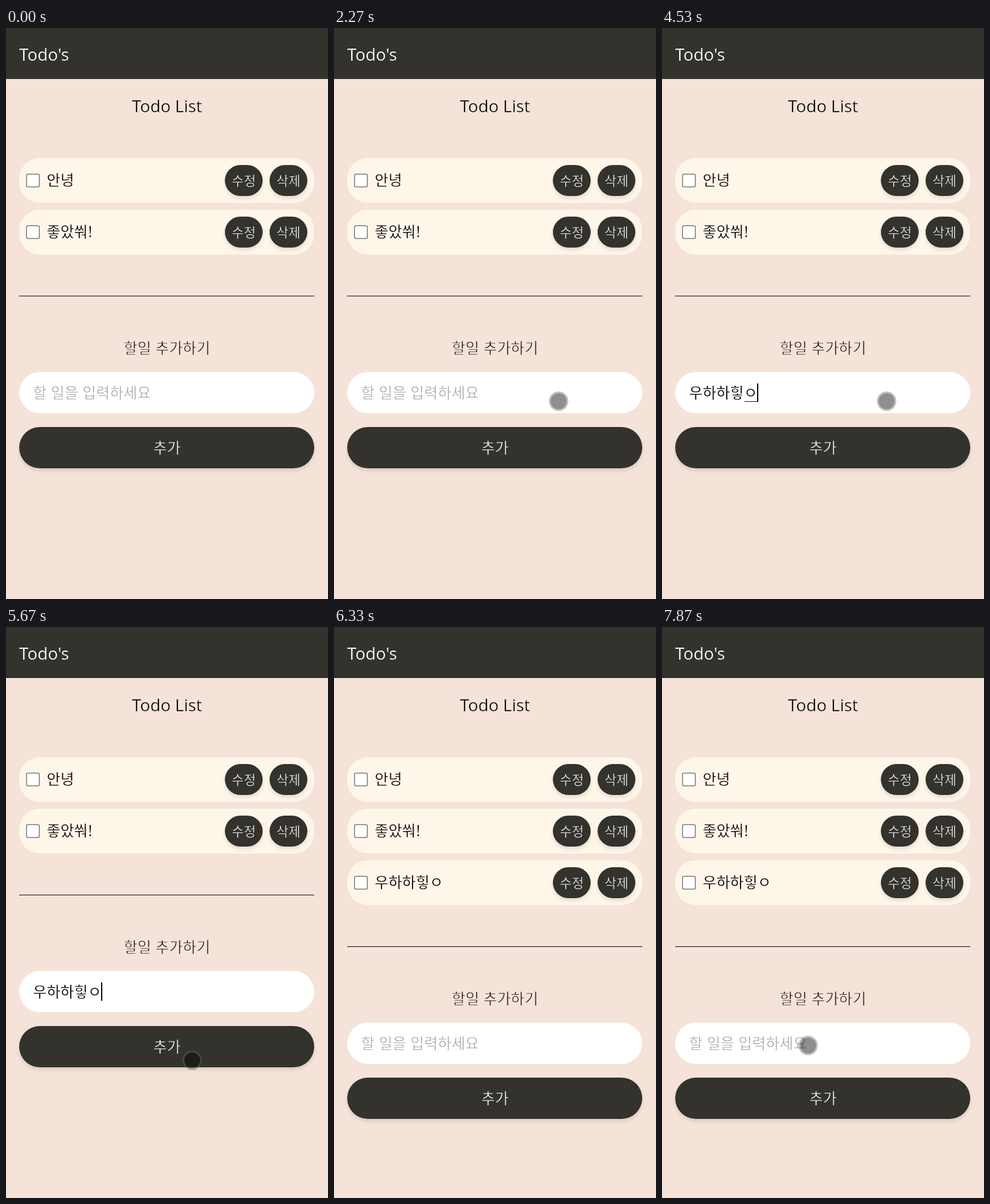
An HTML page for the animation above (8000 ms loop, 562 by 996 pixels).

```html
<!DOCTYPE html>
<html lang="ko">
<head>
<meta charset="utf-8">
<title>Todo's</title>
<style>
  html, body { margin: 0; width: 100%; height: 100%; overflow: hidden; background: #f5e3d9; }
  svg { display: block; width: 562px; height: 996px; }
  text { font-family: "Noto Sans CJK KR", "Noto Sans CJK JP", "Noto Sans CJK", sans-serif; font-size: 26px; font-weight: 300; white-space: pre; }
  .latin { font-family: "Open Sans", "Noto Sans", sans-serif; font-size: 29.4px; font-weight: 400; }
  .small { font-size: 22.8px; }
  .mid { text-anchor: middle; }
  .btn { fill: #33322d; filter: drop-shadow(0 4px 3px rgba(0, 0, 0, .11)); }
</style>
</head>
<body>
<svg id="stage" viewBox="0 0 562 996"></svg>
<script>
const NS = "http://www.w3.org/2000/svg";
const PAPER = "#f5e3d9", DARK = "#33322d", CARD = "#fff6ea";
const LOOP = 8000, TAP = 5730, BLUR = 5870, ADDED = 6330;
const stage = document.getElementById("stage");

function add(parent, tag, attrs, content) {
  const el = document.createElementNS(NS, tag);
  for (const key in attrs) el.setAttribute(key, attrs[key]);
  if (content) el.textContent = content;
  parent.appendChild(el);
  return el;
}
const box = (parent, x, y, width, height, rx, attrs) =>
  add(parent, "rect", { x, y, width, height, rx, ...attrs });

// An outline in the background colour makes the strokes finer.
const label = (parent, x, y, content, cls, fill, back, thin = 0.5) =>
  add(parent, "text", { x, y, class: cls, fill, stroke: back, "stroke-width": thin }, content);
const show = (el, on) => el.setAttribute("visibility", on ? "visible" : "hidden");

function todo(y, content) {
  const row = add(stage, "g", { transform: `translate(0 ${y})` });
  box(row, 23, 0, 515, 78, 36, { fill: CARD });
  box(row, 35.75, 27.75, 22.5, 22.5, 3, { fill: "#fff", stroke: "#767676", "stroke-width": 1.5 });
  label(row, 71, 48, content, "", "#000", CARD, 0.3);
  ["수정", "삭제"].forEach((name, i) => {
    const x = 382 + 78 * i;
    box(row, x, 12, 66, 54, 27, { class: "btn" });
    label(row, x + 33, 47.5, name, "small mid", "#fff", DARK);
  });
  return row;
}

box(stage, 0, 0, 562, 996, 0, { fill: PAPER });
box(stage, 0, 0, 562, 89, 0, { fill: DARK });
label(stage, 23, 57, "Todo's", "latin", "#fff", DARK, 0.2);
label(stage, 281, 147, "Todo List", "latin mid", "#000", PAPER, 0.4);
const rows = ["안녕", "좋았쒀!", "우하하힣ㅇ"].map((name, i) => todo(227 + 90 * i, name));

const form = add(stage, "g", {});
box(form, 23, 467, 515, 1, 0, { fill: "#000" });
label(form, 281, 568, "할일 추가하기", "mid", "#000", PAPER, 0.8);
box(form, 23, 600, 515, 72, 36, { fill: "#fff" });
const hint = label(form, 47, 646, "할 일을 입력하세요", "", "#a1a3ab", "#fff");
const typed = label(form, 47, 646, "", "", "#000", "#fff", 0.3);
const underline = box(form, 48, 651, 24, 1, 0, { fill: "#000" });
const caret = box(form, 47, 620, 2, 32, 0, { fill: "#000" });
box(form, 23, 696, 515, 72, 36, { class: "btn" });
label(form, 281, 742, "추가", "mid", "#fff", DARK);
const press = box(form, 23, 696, 515, 72, 36, { fill: "#000" });

const pointer = add(stage, "g", {});
add(pointer, "circle", { r: 14, fill: "rgba(0,0,0,.44)" });
add(pointer, "circle", { r: 15.4, fill: "none", stroke: "rgba(100,100,100,.4)", "stroke-width": 3 });

const glides = [
  { start: 1600, rest: 1730, end: 5130, from: [444, 583], to: [392, 651] },
  { start: 5270, rest: 5530, end: 6000, from: [352, 724], to: [325, 756] },
  { start: 7470, rest: 7600, end: LOOP, from: [262, 737], to: [255, 730] }
];

function pointerAt(t) {
  const glide = glides.find(g => t >= g.start && t < g.end);
  if (!glide) return null;
  const { start, rest, from, to } = glide;
  const left = (1 - Math.min(1, (t - start) / (rest - start))) ** 2;
  return to.map((v, i) => v + (from[i] - v) * left);
}

// Each consonant first joins the syllable before it, then moves on with its vowel.
const said = "우하하히";
const keyTime = k => 3465 + 185 * k + 13 * k * k;
const LAST_KEY = keyTime(said.length) + 60;
const closeWithH = s => s.slice(0, -1) + String.fromCharCode(s.charCodeAt(s.length - 1) + 27);

function typedAt(t) {
  if (t < keyTime(0) || t >= ADDED) return "";
  let k = 0;
  while (k < said.length && t >= keyTime(k + 1)) k++;
  if (t < keyTime(k) + 60) return k ? closeWithH(said.slice(0, k)) : "ㅇ";
  return k < said.length ? said.slice(0, k + 1) : closeWithH(said) + "ㅇ";
}

const blink = time => Math.floor(time / 515) % 2 === 0;
function caretAt(t) {
  if (t < keyTime(0)) return t >= 1000 && blink(t - 1700);
  if (t < BLUR) return t < LAST_KEY || blink(t - 4530);
  return t >= 7355 && blink(t - 7355);
}

function draw(t) {
  const added = t >= ADDED;
  show(rows[2], added);
  form.setAttribute("transform", `translate(0 ${added ? 90 : 0})`);

  const words = typedAt(t), n = words.length;
  if (typed.textContent !== words) typed.textContent = words;
  show(hint, !n);
  show(underline, n && t < 5600);
  underline.setAttribute("x", 24 + 24 * n);
  caret.setAttribute("x", n ? 46 + 24 * n : 47);
  show(caret, caretAt(t));
  press.setAttribute("opacity", t < TAP ? 0 : 0.18 * Math.max(0, 1 - (t - TAP) / 270));

  const pos = pointerAt(t);
  show(pointer, pos);
  if (pos) pointer.setAttribute("transform", `translate(${pos})`);
}

const begin = performance.now();
function tick() {
  draw((performance.now() - begin) % LOOP);
  requestAnimationFrame(tick);
}
tick();
</script>
</body>
</html>
```
